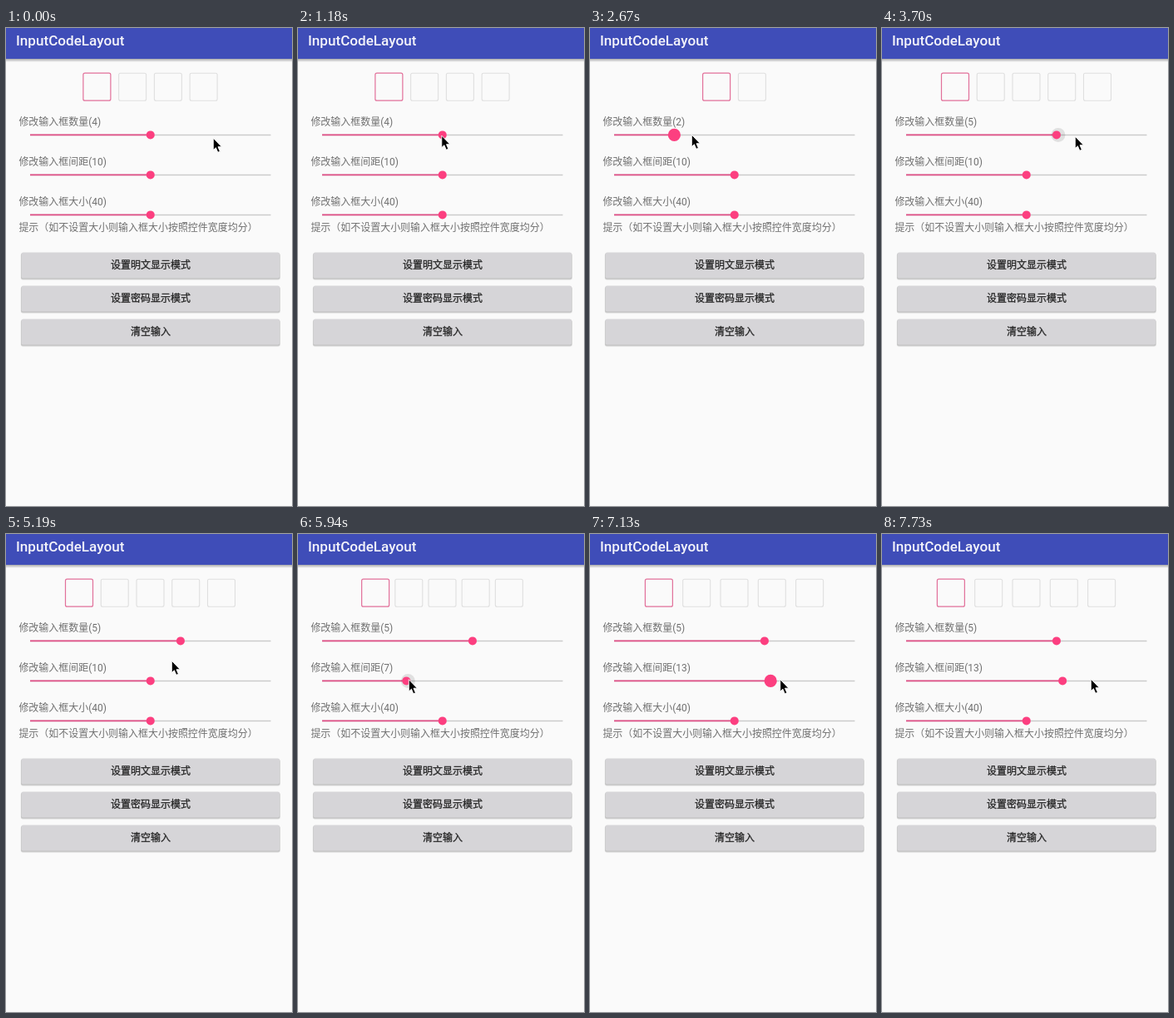
An HTML page for the animation above (8 s loop, 344 by 574 pixels).

```html
<!DOCTYPE html>
<html lang="zh-CN">
<head>
<meta charset="utf-8">
<title>InputCodeLayout</title>
<style>
  html, body { margin: 0; width: 100%; height: 100%; overflow: hidden; background: #fafafa; }
  svg { display: block; width: 100%; height: 100%; }
  text { font: 11.97px Roboto, "Noto Sans CJK SC", "Noto Sans CJK", sans-serif; fill: #707070; }
  .title { font-size: 17.1px; font-weight: 500; fill: #f4f4fa; }
  .button text { font-weight: 500; fill: #262626; stroke: #262626; stroke-width: .3; text-anchor: middle; }
  .button rect { fill: #d6d5d8; }
  .button .shade { fill: #000; opacity: .13; }
  .box { fill: none; stroke: #dfdfdf; stroke-width: 1.1; }
  .box.active { stroke: #e2709a; stroke-width: 1.2; }
  .track { stroke: #cbcbcb; stroke-width: 1.5; }
  .fill { stroke: #e04f86; stroke-width: 1.9; }
  .thumb { fill: #fc3f80; }
  .halo { fill: #000; opacity: .1; }
</style>
</head>
<body>
<svg viewBox="0 0 344 574">
  <defs>
    <linearGradient id="barShade" x2="0" y2="1">
      <stop stop-color="#000" stop-opacity=".32"/>
      <stop offset="1" stop-color="#000" stop-opacity="0"/>
    </linearGradient>
  </defs>
  <rect width="344" height="574" fill="#fafafa"/>
  <rect width="344" height="37" fill="#3f4db8"/>
  <rect y="37" width="344" height="4" fill="url(#barShade)"/>
  <text class="title" x="12" y="21">InputCodeLayout</text>
  <g id="boxes"></g>
  <g id="sliders"></g>
  <text x="15.4" y="244.2">提示（如不设置大小则输入框大小按照控件宽度均分）</text>
  <g id="buttons"></g>
  <path id="cursor" d="M1.3 .2V14.6L4.4 11.7L6.8 17.3L9.4 16.2L7 10.7H11.4Z" stroke="#fff" stroke-width=".9"/>
</svg>
<script>
const LOOP = 8000, STEP = 148.5, LEAD = 15;   // the picture advances in steps of STEP ms
const DP = 0.855, CENTER = 173.5, SIZE = 40;
const TRACK_START = 29, TRACK_LENGTH = 289.5;
const REST = 5, SHRINKING = 6.3, PRESSED = 7.6, HALO = 8.5;

const byId = id => document.getElementById(id);

function set(node, attrs) {
  for (const key in attrs) node.setAttribute(key, attrs[key]);
}

function add(parent, tag, attrs, text = '') {
  const node = document.createElementNS('http://www.w3.org/2000/svg', tag);
  set(node, attrs);
  node.textContent = text;
  parent.append(node);
  return node;
}

function makeSlider(label, row, max) {
  const root = byId('sliders'), y = 128.4 + row * 48;
  const line = { x1: TRACK_START, x2: TRACK_START + TRACK_LENGTH, y1: y, y2: y };
  const text = add(root, 'text', { x: 15.4, y: y - 11.2 });
  add(root, 'line', { ...line, class: 'track' });
  const fill = add(root, 'line', { ...line, class: 'fill' });
  const halo = add(root, 'circle', { cy: y, class: 'halo' });
  const thumb = add(root, 'circle', { cy: y, class: 'thumb' });
  return ({ value, radius, haloRadius }) => {
    const x = TRACK_START + TRACK_LENGTH * value / max;
    text.textContent = `${label}(${value})`;
    set(fill, { x2: x });
    set(halo, { cx: x + 2, r: haloRadius });
    set(thumb, { cx: x, r: radius });
  };
}

const drawCount = makeSlider('修改输入框数量', 0, 8);
const drawGap = makeSlider('修改输入框间距', 1, 20);
const drawSize = makeSlider('修改输入框大小', 2, 2 * SIZE);

const boxes = Array.from({ length: 5 }, (_, i) =>
  add(byId('boxes'), 'rect', { y: 54.2, rx: 2, class: i ? 'box' : 'box active' }));

['设置明文显示模式', '设置密码显示模式', '清空输入'].forEach((label, i) => {
  const y = 269.5 + i * 40;
  const g = add(byId('buttons'), 'g', { class: 'button' });
  add(g, 'rect', { x: 17.8, y: y + 1, width: 312, height: 32, rx: 2.5, class: 'shade' });
  add(g, 'rect', { x: 18.2, y: y + .4, width: 311.2, height: 31.6, rx: 2, class: 'shade' });
  add(g, 'rect', { x: 18.5, y, width: 310.5, height: 31, rx: 2 });
  add(g, 'text', { x: 174, y: y + 19.7 }, label);
});

// Cursor stops; step is the arrival, steps the length of the glide.
const glides = [
  { step: 0, steps: 1, x: 248, y: 132 },
  { step: 1, steps: 1, x: 227, y: 110 },
  { step: 8, steps: 4, x: 171.5, y: 129 },
  { step: 13, steps: 4, x: 121, y: 128 },
  { step: 21, steps: 3, x: 231, y: 130 },
  { step: 29, steps: 2, x: 234, y: 131 },
  { step: 35, steps: 1, x: 198, y: 152 },
  { step: 38, steps: 3, x: 132, y: 174.5 },
  { step: 44, steps: 3, x: 217, y: 169 },
  { step: 46, steps: 2, x: 227.5, y: 174.5 },
  { step: 52, steps: 2, x: 250, y: 174 }
];

const countTaps = [{ step: 0, hold: 0, value: 4 }, { step: 18, hold: 3, value: 2 }, { step: 25, hold: 7, value: 5 }];
const gapTaps = [{ step: 0, hold: 0, value: 10 }, { step: 40, hold: 4, value: 7 }, { step: 48, hold: 1, value: 13 }];

const easeOut = p => 1 - (1 - p) ** 1.7;

function cursorAt(step) {
  const pos = { ...glides[0] };
  for (const { step: end, steps, x, y } of glides) {
    const p = easeOut(Math.min(1, Math.max(0, (step - end + steps) / steps)));
    pos.x += (x - pos.x) * p;
    pos.y += (y - pos.y) * p;
  }
  return pos;
}

// A long press starts with a halo; every press swells the thumb, then lets it shrink.
function thumbAt(taps, step) {
  const { step: start, hold, value } = taps.findLast(tap => tap.step <= step);
  const age = step - start, left = hold - age;
  if (left <= 0) return { value, radius: REST, haloRadius: 0 };
  if (hold > 3 && age === 0) return { value, radius: REST, haloRadius: HALO };
  return { value, radius: left === 1 && age > 0 ? SHRINKING : PRESSED, haloRadius: 0 };
}

function drawBoxes(count, gap) {
  const side = SIZE * DP, pitch = side + gap * DP, inset = .6;
  const left = CENTER - (count * pitch - gap * DP) / 2;
  boxes.forEach((box, i) => set(box, {
    x: left + i * pitch + inset, width: side - 2 * inset, height: side - 2 * inset,
    visibility: i < count ? 'visible' : 'hidden'
  }));
}

function render(t) {
  const step = Math.floor((t + LEAD) / STEP);
  const count = thumbAt(countTaps, step), gap = thumbAt(gapTaps, step), { x, y } = cursorAt(step);
  drawCount(count);
  drawGap(gap);
  drawBoxes(count.value, gap.value);
  set(byId('cursor'), { transform: `translate(${x} ${y})` });
}

drawSize({ value: SIZE, radius: REST, haloRadius: 0 });
const start = performance.now();
(function tick() {
  render((performance.now() - start) % LOOP);
  requestAnimationFrame(tick);
})();
</script>
</body>
</html>
```
